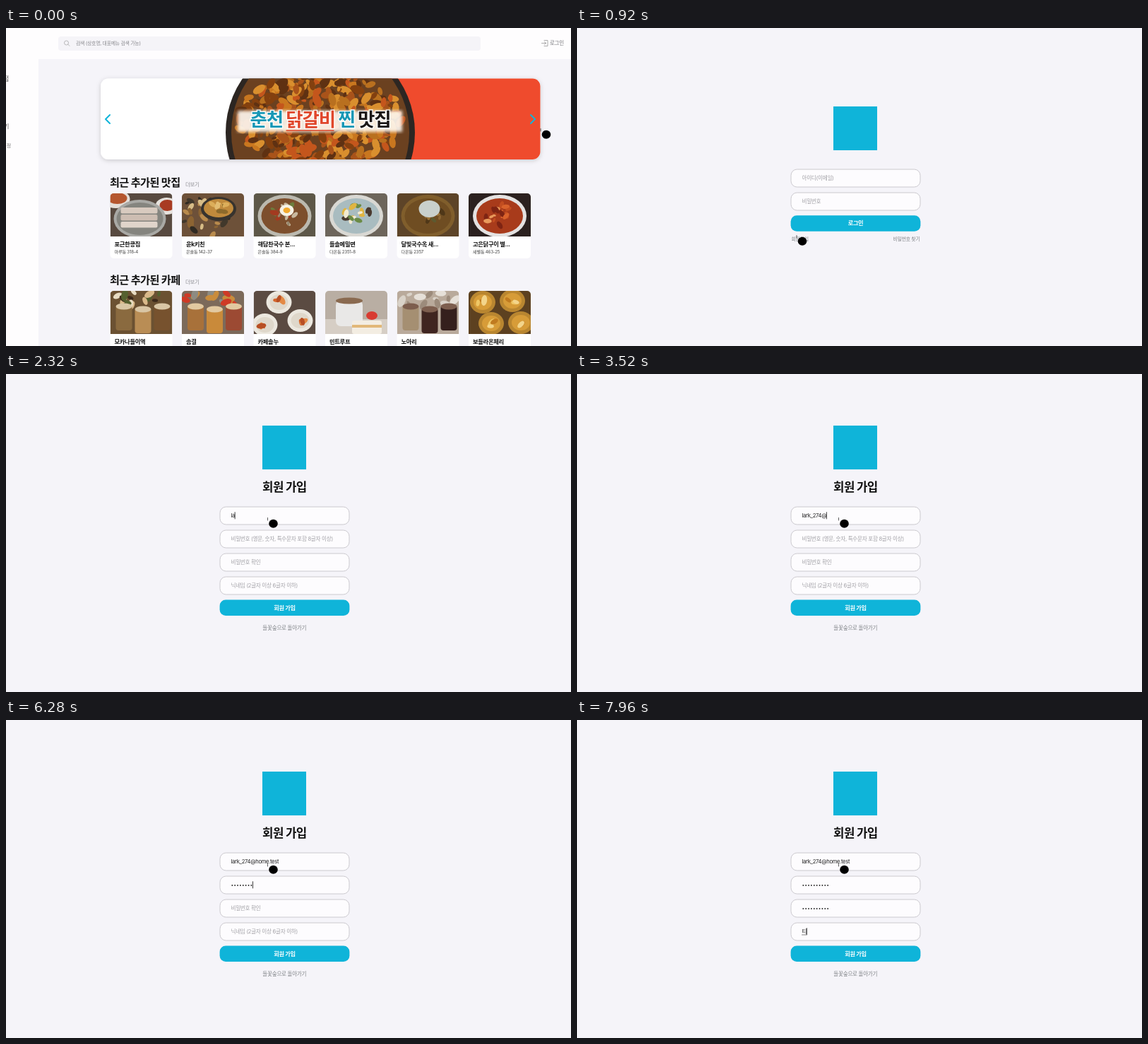
These frames come from a looping animation (800x450 px, 8000 ms). An HTML page:

```html
<!DOCTYPE html>
<html lang="ko">
<meta charset="utf-8">
<style>
  html, body { margin: 0; width: 100%; height: 100%; overflow: hidden; background: #f5f4f9; }
  svg { display: block; width: 800px; height: 450px; }
  text { font-family: Inter, "Noto Sans CJK KR", "Noto Sans CJK", sans-serif; letter-spacing: -.04em; white-space: pre; }
</style>
<svg id="stage" viewBox="0 0 800 450"></svg>
<script>
const LOOP = 8000, BLUE = '#0fb4d9', GRAY = '#808488';
const stage = document.getElementById('stage');

let seed = 7;
const random = () => (seed = seed * 16807 % 2147483647) / 2147483647;

const rect = (x, y, w, h, fill, extra = '') =>
  `<rect x="${x}" y="${y}" width="${w}" height="${h}" fill="${fill}" ${extra}/>`;
const oval = (x, y, rx, ry, fill, extra = '') =>
  `<ellipse cx="${x}" cy="${y}" rx="${rx}" ry="${ry}" fill="${fill}" ${extra}/>`;
const text = (str, x, y, size, fill, weight = 400, anchor = 'start', extra = '') =>
  `<text x="${x}" y="${y}" font-size="${size}" fill="${fill}" font-weight="${weight}" text-anchor="${anchor}" ${extra}>${str}</text>`;
const line = (d, color, width) =>
  `<path d="${d}" fill="none" stroke="${color}" stroke-width="${width}" stroke-linecap="round" stroke-linejoin="round"/>`;

function scatter(n, cx, cy, rx, ry, size, colors) {
  let out = '';
  for (let i = 0; i < n; i++) {
    const a = random() * 6.283, r = Math.sqrt(random()), s = size * (.5 + random());
    const x = (cx + Math.cos(a) * r * rx).toFixed(1), y = (cy + Math.sin(a) * r * ry).toFixed(1);
    out += oval(x, y, s.toFixed(1), (s * .55).toFixed(1), colors[i % colors.length],
      `transform="rotate(${Math.floor(random() * 180)} ${x} ${y})"`);
  }
  return out;
}

// Simplified photos, drawn in an 88 x 61 box
const bowl = (bg, dish, food, ...bits) => rect(0, 0, 88, 61, bg) + oval(44, 32, 38, 30, dish) +
  oval(44, 32, 33, 25, food) + scatter(18, 44, 31, 22, 15, 4.5, bits);
const cups = (bg, rim, drinks, ...bits) => rect(0, 0, 88, 61, bg) + scatter(14, 44, 12, 42, 12, 6, bits) +
  drinks.map((drink, i) => rect(8 + i * 27, 20 + i % 2 * 4, 23, 36, drink, 'rx="4"') +
    oval(19.5 + i * 27, 22 + i % 2 * 4, 11.5, 4.5, rim)).join('');
const plates = (bg, rim, food, spots, ...bits) => rect(0, 0, 88, 61, bg) +
  spots.map(([x, y]) => oval(x, y, 18, 16, rim) + oval(x, y, 13, 11, food) + scatter(3, x, y, 7, 5, 5, bits)).join('');

const meat = oval(8, 8, 20, 13, '#e4dfd9') + oval(10, 7, 14, 8, '#b5572f') + oval(80, 18, 16, 12, '#e6e2dd') +
  oval(81, 17, 11, 8, '#a83b22') + oval(42, 36, 37, 27, '#a9a9a5') + oval(42, 36, 33, 23, '#85857f') +
  [0, 1, 2].map(i => rect(15, 20 + i * 10, 52, 8.5, ['#d8cabf', '#cdbdb2', '#e0d5cb'][i], 'rx="2"')).join('');
const mug = rect(0, 0, 88, 61, '#b9aea3') + rect(0, 40, 88, 21, '#d6cec5') + rect(15, 13, 38, 37, '#e9e8e7', 'rx="7"') +
  oval(34, 14, 19, 4.5, '#8a6a50') + rect(38, 42, 42, 19, '#f3ede2', 'rx="3"') + rect(38, 48, 42, 4, '#e2b878') + oval(66, 35, 8, 6, '#d83b31');

const restaurants = [
  ['포근한콩집', '마루동 318-4', rect(0, 0, 88, 61, '#584a40') + meat],
  ['윤k키친', '은솔동 142-37', rect(0, 0, 88, 61, '#6d5139') + scatter(34, 30, 34, 36, 28, 6, ['#2f2a22', '#b98b4d', '#d8bd87', '#41382b', '#8c6433']) + oval(52, 22, 25, 17, '#37332e') + oval(52, 21, 21, 13, '#c08a3c') + scatter(10, 52, 21, 14, 8, 4, ['#e3bd72', '#8c6a2c', '#dcae5a'])],
  ['해담찬국수 본...', '은솔동 384-9', bowl('#5d5748', '#bbb9af', '#7d4f2d', '#c9b9a0', '#a33a20', '#6d7c3c', '#96876d') + oval(47, 24, 10, 8, '#f7f2e6') + oval(47, 24, 5, 4, '#f2a92f')],
  ['들솔메밀면', '다온동 2351-8', bowl('#6d655b', '#d9d8d3', '#a9bcc0', '#f3ead1', '#e0b541', '#6b8b45', '#4a3a2f')],
  ['달빛국수옥 새...', '다온동 2357', bowl('#5d4428', '#805e2c', '#6f4d22', '#9c7438', '#5d5a30', '#8a6534', '#4f3718') + oval(46, 22, 15, 12, '#c9d0cc')],
  ['고은닭구이 별...', '새별동 463-25', bowl('#2b211f', '#e4e2e1', '#a83b1b', '#d9622b', '#7e2413', '#e99a5b', '#c24d20')]
];
const cafes = [
  ['모카나들이역', '', cups('#6b5132', '#d9c6a5', ['#8a6a3f', '#b98d55', '#77522e'], '#55602f', '#d9b98a', '#3d2a1b', '#e8dcc2')],
  ['솜결', '', cups('#7c6a5a', '#e2c9a0', ['#a8713a', '#c98a3a', '#9c4a33'], '#c98c3c', '#cf3a26', '#8d8b82')],
  ['카페솔누', '', plates('#5b4b42', '#ece8df', '#dfd8cb', [[36, 16], [66, 42], [16, 48]], '#d4652c', '#e48a45', '#b84f24')],
  ['민트루프', '', mug],
  ['노아리', '', cups('#b9aa9b', '#7d5e4e', ['#a58f72', '#3f2520', '#35201d'], '#d9d2c8', '#9c8b7b', '#e6e0d8')],
  ['보들라온체리', '', plates('#5d4120', '#b98630', '#d79c38', [[20, 16], [62, 14], [32, 46], [74, 45]], '#efc766', '#c07b20', '#f3d58b')]
];

const card = ([name, address, photo], i, y) => `<g transform="translate(${147.5 + i * 101.5} ${y})">
  ${rect(0, 0, 88, 92, '#fff', 'rx="5"')}<g clip-path="url(#photo)">${photo}</g>
  ${text(name, 6, 74.5, 8.3, '#111', 700)}${text(address, 6, 84.5, 6.2, '#444')}</g>`;
const section = (title, cards, y) => text(title, 147, y + 5.5, 15.2, '#111', 700) +
  text('더보기', 254, y + 5.5, 7.4, '#8d8d92') + cards.map((c, i) => card(c, i, y + 16)).join('');

const banner = `<g filter="url(#shadow)">${rect(134, 71.5, 622.5, 114.5, '#fff', 'rx="11"')}</g>
  <g clip-path="url(#banner)">${rect(445, 71, 312, 116, '#ef4b2d')}
  ${oval(445, 148, 134, 134, '#2c2622')}${oval(445, 148, 126, 128, '#6b4120')}
  ${scatter(420, 445, 130, 116, 68, 7, ['#c9771f', '#a9531a', '#d98f2e', '#83400f', '#b9701f', '#5f3112', '#c4561c'])}</g>
  <g filter="url(#soft)">${rect(328, 117, 233, 30, '#fffaf2', 'opacity=".9"')}</g>
  ${text(`<tspan fill="#1797b5">춘천 </tspan><tspan fill="#e0472b">닭갈비 </tspan><tspan fill="#1797b5">찐 </tspan><tspan fill="#1b1716">맛집</tspan>`,
    445, 139, 26.5, '#111', 900, 'middle', 'stroke="#fff" stroke-width="2.5" paint-order="stroke"')}
  ${line('M397 145h67', '#e0472b', 1.3)}
  ${line('M147 123l-6 6l6 6', BLUE, 2)}${line('M743 123l6 6l-6 6', BLUE, 2)}`;

const home = rect(0, 0, 800, 44, '#fefdfe') + rect(0, 0, 46, 450, '#fefdfe') +
  rect(74, 12, 598, 20, '#f5f4f8', 'rx="4"') +
  `<circle cx="85.5" cy="21" r="3" fill="none" stroke="#aaa" stroke-width=".8"/>` + line('M87.8 23.2l2.2 2.2', '#aaa', .8) +
  text('검색 (상호명, 대표메뉴 검색 가능)', 99, 24.2, 6.9, '#88888d') +
  line('M762 17.5h5v8h-5M758.5 21.5h6m-2-2l2 2l-2 2', '#999', .8) + text('로그인', 770, 24.2, 7.5, '#77777c') +
  text('점', 4, 74.5, 9, '#555', 400, 'end') + text('기', 4, 142, 8, '#555', 400, 'end') + text('정', 7, 169, 7, '#777', 400, 'end') +
  banner + section('최근 추가된 맛집', restaurants, 218) + section('최근 추가된 카페', cafes, 356);

const logo = y => rect(363, y, 62, 62, BLUE);
const box = y => rect(303, y, 183, 25, '#fdfcfe', 'rx="8.5" stroke="#cbc9ce" stroke-width="1"');
const hint = (str, y, id = '') => text(str, 318.5, y + 15.2, 7.6, '#a2a1a6', 400, 'start', id);
const button = (label, y) => rect(302.6, y, 183.8, 22.6, BLUE, 'rx="8.5"') + text(label, 394.5, y + 14.2, 8.2, '#fff', 700, 'middle');

const login = logo(111) + box(200) + hint('아이디(이메일)', 200) + box(233) + hint('비밀번호', 233) +
  button('로그인', 265.2) + text('회원가입', 303.5, 300.8, 6.9, GRAY, 500) +
  text('비밀번호 찾기', 485.5, 300.8, 6.9, GRAY, 500, 'end');

const fieldY = [188, 221, 254, 287];
const hints = ['아이디(이메일)', '비밀번호 (영문, 숫자, 특수문자 포함 8글자 이상)', '비밀번호 확인', '닉네임 (2글자 이상 6글자 이하)'];
const signup = logo(73) + text('회원 가입', 394.3, 166.3, 16.8, '#111', 700, 'middle') +
  fieldY.map((y, i) => box(y) + hint(hints[i], y, `id="hint${i}"`) + (i % 3
    ? `<path id="value${i}" fill="none" stroke="#222" stroke-width="1.8" stroke-linecap="round" stroke-dasharray="0 3.87"/>`
    : text('', 318.5, y + 15.2, 7.6, '#222', 400, 'start', `id="value${i}"`))).join('') +
  line('M318.5 304h6', '#333', .6).replace('<path', '<path id="underline"') +
  button('회원 가입', 319.4) + text('들꽃숲으로 돌아가기', 394.3, 361.8, 7.6, GRAY, 500, 'middle') +
  rect(318, 0, .8, 10, '#111', 'id="caret"');

stage.innerHTML = `<defs>
  <clipPath id="photo"><path d="M0 61V5a5 5 0 0 1 5-5h78a5 5 0 0 1 5 5v56z"/></clipPath>
  <clipPath id="banner">${rect(134, 71.5, 622.5, 114.5, '#fff', 'rx="11"')}</clipPath>
  <filter id="shadow"><feDropShadow dx="0" dy="1.5" stdDeviation="3" flood-opacity=".18"/></filter>
  <filter id="soft"><feGaussianBlur stdDeviation="2"/></filter></defs>
  ${rect(0, 0, 800, 450, '#f5f4f9')}
  <g id="home">${home}</g><g id="login">${login}</g><g id="signup">${signup}</g>
  <g id="pointer">${oval(8, 6.8, 6.3, 6, '#000')}${line('M0 -1.5v3.5', '#333', .8)}</g>`;

const $ = id => document.getElementById(id);
const show = (id, on) => $(id).setAttribute('display', on ? 'inline' : 'none');

const email = 'lark_274@home.test';
const steps = (n, start, gap) => Array.from({ length: n }, (_, i) => start + i * gap);
const keys = [
  [2120, 2280, 2400, 2560, 2920, 3040, 3200, 3360, 3520, ...steps(9, 3600, 62)],
  steps(10, 5440, 115),
  steps(10, 6760, 80),
  [7800, 7920]
];
const focusAt = [1720, 4320, 6640, 7640];
const path = [[40, 757, 144], [260, 773, 20], [420, 773, 20], [840, 311, 295], [1140, 311, 295], [1500, 370.5, 205]];

function pointerAt(t) {
  const next = path.findIndex(p => p[0] > t);
  if (next < 1) return (next ? path[path.length - 1] : path[0]).slice(1);
  const [t0, x0, y0] = path[next - 1], [t1, x1, y1] = path[next];
  const k = (t - t0) / (t1 - t0), e = k * k * (3 - 2 * k);
  return [x0 + (x1 - x0) * e, y0 + (y1 - y0) * e];
}

function draw(t) {
  show('home', t < 320);
  show('login', t >= 320 && t < 1100);
  show('signup', t >= 1100);
  $('pointer').setAttribute('transform', `translate(${pointerAt(t).join(' ')})`);

  const counts = keys.map(times => times.filter(k => k <= t).length);
  $('value0').textContent = email.slice(0, counts[0]);
  $('value3').textContent = ['', 'ㅌ', '티'][counts[3]];
  for (const i of [1, 2])
    $('value' + i).setAttribute('d', counts[i] ? `M320.3 ${fieldY[i] + 13}h${counts[i] * 3.87 - 3.8}` : '');
  counts.forEach((n, i) => show('hint' + i, !n));
  show('underline', counts[3]);

  const active = focusAt.filter(f => f <= t).length - 1;
  if (active < 0) return show('caret', false);
  const n = counts[active], last = n ? keys[active][n - 1] : focusAt[active];
  const width = active % 3 ? n * 3.87 : n ? $('value' + active).getComputedTextLength() : 0;
  $('caret').setAttribute('x', 318.2 + width);
  $('caret').setAttribute('y', fieldY[active] + 7.3);
  show('caret', t - last < 300 || (t - 40) % 600 < 400);
}

function frame() {
  draw(performance.now() % LOOP);
  requestAnimationFrame(frame);
}
frame();
</script>
</html>
```
